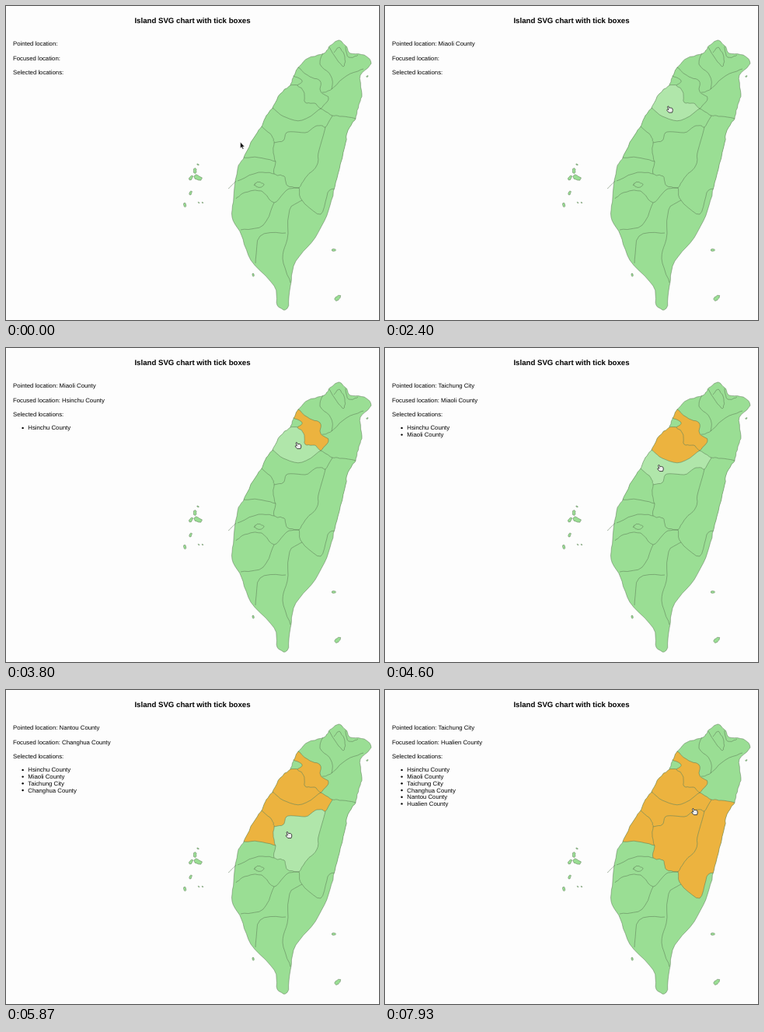
Write an HTML page that moves like this. It is 480x404 px and loops after 8000 ms.

```html
<!DOCTYPE html>
<html lang="en">
<head>
<meta charset="utf-8">
<title>Island SVG chart with tick boxes</title>
<style>
  html, body { margin: 0; width: 100%; height: 100%; overflow: hidden; background: #fdfdfd; }
  svg { display: block; width: 480px; height: 404px; font: 7.78px "Liberation Sans", Arial, sans-serif; text-rendering: geometricPrecision; }
  .title { font-size: 9.67px; font-weight: bold; text-anchor: middle; }
  .land { fill: #9ade94; }
  .line { fill: none; }
  .line, .isle { stroke: #55704f; stroke-opacity: .75; stroke-width: .65; stroke-linejoin: round; }
</style>
</head>
<body>
<svg viewBox="0 0 480 404">
  <text class="title" x="240" y="22.2">Island SVG chart with tick boxes</text>
  <text id="pointed" x="9" y="51.3"></text>
  <text id="focused" x="9" y="69.9"></text>
  <text x="9" y="88.4">Selected locations:</text>
  <g id="list"></g>
  <g id="map"></g>
  <path id="arrow" d="M-2-4.5V3.6L-.2 2 1.1 4.8 2.4 4.2 1.2 1.5H3.6Z" fill="#111" stroke="#fff" stroke-width=".5"/>
  <path id="hand" d="M-1.6 0L-3-3.8Q-2.6-5-1.6-4.4L-.5-2.2 1-2.6 2.4-2.2 3.5-1.4 3.8 1 3 3.6H-1.2L-3.6 1Q-4-.4-2.8-.4Z"
        fill="#eee" stroke="#333" stroke-width=".9" stroke-linejoin="round"/>
</svg>
<script>
const LOOP = 8000, SELECT_DELAY = 120;
const GREEN = '#9ade94', HOVER = '#b0e6aa', ORANGE = '#ecb33f';
const $ = id => document.getElementById(id);

function add(parent, tag, attrs, text = '') {
  const node = document.createElementNS('http://www.w3.org/2000/svg', tag);
  for (const key in attrs) node.setAttribute(key, attrs[key]);
  node.textContent = text;
  return parent.appendChild(node);
}

// Junctions: capitals lie on the coast, small letters inland.
const junctions = {
  T: '376,79', Y: '450,145', O: '422.5,235', U: '306,195', D: '329,155', M: '343,131', C: '366,102', H: '370,90',
  b: '405,132', c: '375,102', d: '420,141', e: '411,156', f: '345,176', g: '347,200', h: '377,234'
};

// Key points between the two junctions named by each key.
const arcs = {
  TY: '389,67 409,61 417,51 428,44 437,51 443,61 461,63 470,74 456,89 458,113 454,127',
  YO: '440,160 437,176 429,210',
  OU: '415,263 398,298 373,328 366,360 362,389 349,385 345,360 315,327 303,295 291,272 293,246 298,210',
  UD: '318,171', DM: '335,141', MC: '353,113', CH: '', HT: '',
  Tb: '391,91 404,96 405,110 415,119', bc: '397,125 385,124 383,110', cH: '381,96', Cc: '',
  Mb: '357,142 381,147', bd: '', de: '',
  ef: '400,154 385,163 363,162 357,173', fD: '342,167', fg: '344,189', gU: '325,195',
  gh: '345,216 358,219 362,231', eh: '403,185 400,205 388,218', hO: '381,250 405,268 414,240', dY: '433,142'
};

const regions = {
  'Hsinchu County': 'TbcHT', 'Miaoli County': 'MCcbM', 'Taichung City': 'DMbdefD',
  'Changhua County': 'UDfgU', 'Nantou County': 'fehgf', 'Hualien County': 'dYOhed'
};
const ISLAND = 'TYOUDMCHT';

const innerLines = [
  '408,61 404,75 418,90 419,107 407,111',
  '416,53 424,66 434,78 436,66 429,53 422,60',
  '437,52 441,66 453,63',
  '460,81 438,90 419,107',
  '298,225 325,214 345,216',
  '319,230 325,226.5 332,230 325,233.5 319,230',
  '296,248 307,240 329,238 345,253 361,237 377,234',
  '345,253 331,282 302,288',
  '321,331 327,296 360,292',
  '381,250 365,262 362,300 356,325 366,356',
  '286,235 296,225'
];

// Centre and radius of each islet.
const islets = [
  [247, 204, 1], [243, 212, 2.5], [238, 221, 2.5], [247, 221, 4], [237.5, 240.5, 2], [230, 256, 2],
  [248, 253, .7], [253, 253, .7], [318, 346, 1.5], [422, 314, 2], [465, 90.5, 1], [427, 375.5, 3.5]
];

// A Catmull-Rom curve through the key points, with a small wobble that depends on place.
function curve(text) {
  const STEPS = 5, WOBBLE = .45;
  const keys = text.trim().split(/\s+/).map(pair => pair.split(',').map(Number));
  const points = [keys[0]];
  for (let i = 0; i < keys.length - 1; i++) {
    const p1 = keys[i], p2 = keys[i + 1], p0 = keys[i - 1] ?? p1, p3 = keys[i + 2] ?? p2;
    for (let k = 1; k <= STEPS; k++) {
      const u = k / STEPS;
      points.push(p1.map((v, j) => {
        const slope = p2[j] - p0[j];
        const bend = 2 * p0[j] - 5 * v + 4 * p2[j] - p3[j];
        const twist = 3 * v - p0[j] - 3 * p2[j] + p3[j];
        const smooth = v + u * (slope + u * (bend + u * twist)) / 2;
        return smooth + (k < STEPS ? WOBBLE * Math.sin(smooth * 37 + i + j) : 0);
      }));
    }
  }
  return points;
}

const paths = {};
for (const key in arcs) paths[key] = curve(`${junctions[key[0]]} ${arcs[key]} ${junctions[key[1]]}`);

// Walks from junction to junction, taking arcs backwards where needed.
function ring(names) {
  const points = [];
  for (let i = 0; i < names.length - 1; i++) {
    const from = names[i], to = names[i + 1];
    points.push(...(paths[from + to] ?? [...paths[to + from]].reverse()));
  }
  return points.join(' ');
}

const shapes = {};
add($('map'), 'polygon', { points: ring(ISLAND), class: 'land' });
for (const name in regions) shapes[name] = add($('map'), 'polygon', { points: ring(regions[name]) });
for (const line of [...Object.values(paths), ...innerLines.map(curve)]) {
  add($('map'), 'polyline', { points: line.join(' '), class: 'line' });
}
for (const [x, y, radius] of islets) {
  const points = Array.from({ length: 9 }, (_, i) => {
    const angle = i * Math.PI * 2 / 9, r = radius * (1 + .4 * Math.sin(i * 5 + x));
    return [x + r * Math.cos(angle), y + r * Math.sin(angle)];
  });
  add($('map'), 'polygon', { points: points.join(' '), class: 'land isle' });
}

// Each stop of the pointer: travel from start to end, then an optional click.
const stops = [
  { start: 0, end: 1, x: 303.5, y: 179.5, place: '' },
  { start: 70, end: 200, x: 325, y: 180, place: 'Changhua County' },
  { start: 800, end: 1330, x: 346, y: 153, place: 'Taichung City' },
  { start: 1870, end: 2130, x: 366.5, y: 133.5, place: 'Miaoli County' },
  { start: 2400, end: 2800, x: 394, y: 112, place: 'Hsinchu County', click: 3000 },
  { start: 3670, end: 3800, x: 376, y: 126, place: 'Miaoli County', click: 4070 },
  { start: 4470, end: 4600, x: 354.5, y: 155, place: 'Taichung City', click: 4800 },
  { start: 5070, end: 5270, x: 331, y: 180, place: 'Changhua County', click: 5330 },
  { start: 5800, end: 5870, x: 364, y: 187, place: 'Nantou County', click: 6130 },
  { start: 6350, end: 6800, x: 421, y: 183, place: 'Hualien County', click: 7000 },
  { start: 7670, end: 7930, x: 398.5, y: 157, place: 'Taichung City' }
];
const clicked = stops.filter(stop => stop.click);

const items = clicked.map(({ place, click }, i) => {
  const node = add($('list'), 'g', { transform: `translate(0 ${105.4 + i * 8.7})` });
  add(node, 'circle', { cx: 21.6, cy: -2.5, r: 1.2 });
  add(node, 'text', { x: 28.3 }, place);
  return { node, place, time: click + SELECT_DELAY };
});

function draw() {
  const t = performance.now() % LOOP;
  const index = stops.findLastIndex(stop => stop.start <= t);
  const stop = stops[index], last = stops[index - 1] ?? stop;
  const u = Math.min(1, (t - stop.start) / (stop.end - stop.start));
  const ease = u * u * (3 - 2 * u);
  const pointed = (u < .5 ? last : stop).place;
  const focused = clicked.findLast(({ click }) => click <= t)?.place ?? '';

  $('pointed').textContent = 'Pointed location: ' + pointed;
  $('focused').textContent = 'Focused location: ' + focused;
  for (const { node, place, time } of items) {
    const selected = t >= time;
    node.style.display = selected ? '' : 'none';
    shapes[place].style.fill = selected ? ORANGE : place === pointed ? HOVER : GREEN;
  }
  const x = last.x + (stop.x - last.x) * ease, y = last.y + (stop.y - last.y) * ease;
  for (const id of ['arrow', 'hand']) {
    $(id).setAttribute('transform', `translate(${x} ${y})`);
    $(id).style.display = (id === 'hand') === !!pointed ? '' : 'none';
  }
  requestAnimationFrame(draw);
}
draw();
</script>
</body>
</html>
```
